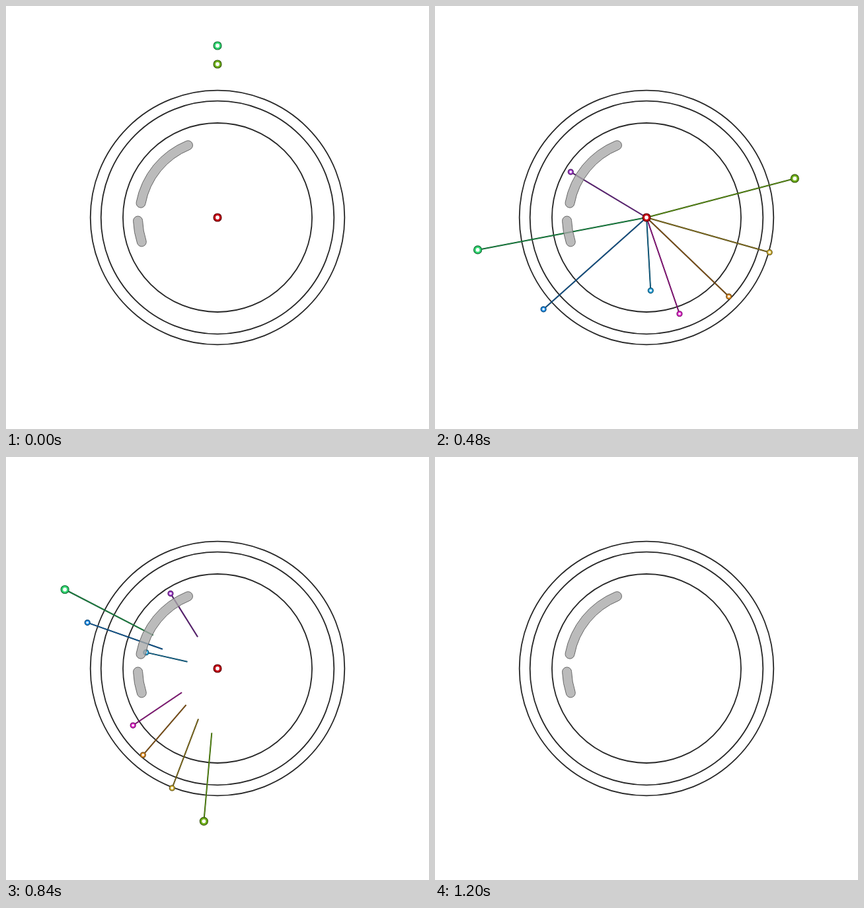
An HTML page with a canvas that plays this animation: 640x640 px, repeating every 1.23 s.

```html
<!DOCTYPE html>
<html lang="en">
<head>
<meta charset="utf-8">
<title>Orbiting hands</title>
<style>
html, body { margin: 0; height: 100%; overflow: hidden; background: #fff; }
canvas { display: block; width: 640px; height: 640px; }
</style>
</head>
<body>
<canvas id="stage" width="640" height="640"></canvas>
<script>
const ctx = document.getElementById('stage').getContext('2d');
const LOOP = 1230, STEP = 30, TAU = Math.PI * 2;

// Angles in degrees clockwise from the top, at these times.
const times = [0, 240, 390, 570, 720, 960, 1170];
const hands = [
  { r: 260,   size: 6, hue: 143, sat: 68, deg: [0, 163.4, 250.9, 265.1, 280, 318, 360] },
  { r: 232,   size: 6, hue: 86,  sat: 75, deg: [0, 46.6, 68.8, 82.6, 125, 254.2, 360] },
  { r: 208.7, size: 4, hue: 207, sat: 82, deg: [0, 140.7, 212.1, 241.1, 266.4, 314, 360] },
  { r: 193.5, size: 4, hue: 48,  sat: 62, deg: [0, 65.3, 101, 110.6, 147, 263.5, 360] },
  { r: 172.7, size: 4, hue: 34,  sat: 72, deg: [0, 86, 127, 140.4, 174, 274.7, 360] },
  { r: 154.1, size: 4, hue: 307, sat: 76, deg: [0, 100, 154.6, 166.9, 195.5, 283.5, 360] },
  { r: 133.8, size: 4, hue: 282, sat: 58, deg: [0, 196.5, 291.4, 307.1, 317.1, 339.8, 360] },
  { r: 110.8, size: 4, hue: 199, sat: 74, deg: [0, 89, 142.7, 209.4, 254.8, 309.1, 360] },
];

const ease = (t, from, to) => {
  const p = Math.min(1, Math.max(0, (t - from) / (to - from)));
  return (1 - Math.cos(Math.PI * p)) / 2;
};

// Monotone cubic through the key angles, starting from rest.
function angleAt(deg, t) {
  const last = times.length - 1;
  if (t >= times[last]) return deg[last];
  const slope = i => (deg[i + 1] - deg[i]) / (times[i + 1] - times[i]);
  const tangent = i => {
    if (i === 0) return 0;
    if (i === last) return slope(last - 1);
    const a = slope(i - 1), b = slope(i);
    return (i === 1 ? 1.4 : 1) * 2 * a * b / (a + b);
  };
  let i = 0;
  while (t >= times[i + 1]) i++;
  const span = times[i + 1] - times[i], u = (t - times[i]) / span, v = 1 - u;
  return deg[i] * v * v * (1 + 2 * u) + deg[i + 1] * u * u * (3 - 2 * u)
    + span * u * v * (tangent(i) * v - tangent(i + 1) * u);
}

function circle(x, y, r, color, width, fill) {
  ctx.beginPath();
  ctx.arc(x, y, r, 0, TAU);
  if (fill) {
    ctx.fillStyle = fill;
    ctx.fill();
  }
  ctx.strokeStyle = color;
  ctx.lineWidth = width;
  ctx.stroke();
}

function bead(x, y, size, hue, sat, light) {
  const big = size > 5;
  circle(x, y, size, `hsl(${hue} ${sat}% ${light * 0.5}%)`, 1.2, `hsl(${hue} ${sat}% ${light}%)`);
  ctx.beginPath();
  ctx.arc(x, y, big ? 2.9 : 1.8, 0, TAU);
  ctx.fillStyle = '#fff';
  ctx.fill();
}

function line(hand, angle, from, to) {
  if (to - from < 0.005) return;
  const sin = Math.sin(angle) * hand.r, cos = -Math.cos(angle) * hand.r;
  const stroke = (width, light) => {
    ctx.beginPath();
    ctx.moveTo(sin * from, cos * from);
    ctx.lineTo(sin * to, cos * to);
    ctx.lineWidth = width;
    ctx.strokeStyle = `hsl(${hand.hue} ${hand.sat}% ${light}%)`;
    ctx.stroke();
  };
  stroke(2, 18);
  stroke(1, 34);
}

// Rounded band along an arc around the centre.
function glare(r, start, end) {
  const half = 7, cap = (a, turn) =>
    ctx.arc(r * Math.cos(a), r * Math.sin(a), half, a + turn, a + turn + Math.PI);
  ctx.beginPath();
  ctx.arc(0, 0, r + half, start, end);
  cap(end, 0);
  ctx.arc(0, 0, r - half, end, start, true);
  cap(start, Math.PI);
  ctx.closePath();
  ctx.fillStyle = 'rgba(168, 168, 168, 0.78)';
  ctx.fill();
  ctx.strokeStyle = '#666';
  ctx.lineWidth = 1;
  ctx.stroke();
}

function draw(t) {
  ctx.setTransform(1, 0, 0, 1, 0, 0);
  ctx.fillStyle = '#fff';
  ctx.fillRect(0, 0, 640, 640);
  ctx.translate(320, 320);
  for (const r of [192.3, 176.3, 143]) circle(0, 0, r, '#262626', 1.8);

  const active = t < 1200;
  if (active) {
    const head = ease(t, 30, 420), tail = ease(t, 570, 1170);
    for (const hand of hands) {
      if (t < STEP && hand.size < 5) continue;
      const angle = angleAt(hand.deg, t) * Math.PI / 180;
      line(hand, angle, tail, head);
      bead(hand.r * Math.sin(angle), -hand.r * Math.cos(angle),
        hand.size, hand.hue, hand.sat, hand.hue === 86 ? 40 : 52);
    }
  }
  glare(118, Math.atan2(-22, -117) + TAU, Math.atan2(-108, -44) + TAU);
  glare(120.5, Math.atan2(37, -115), Math.atan2(5, -121));
  if (active) bead(0, 0, 6, 355, 100, 39);
}

function tick() {
  const t = performance.now() % LOOP;
  draw(Math.floor(t / STEP) * STEP);
  requestAnimationFrame(tick);
}
tick();
</script>
</body>
</html>
```
